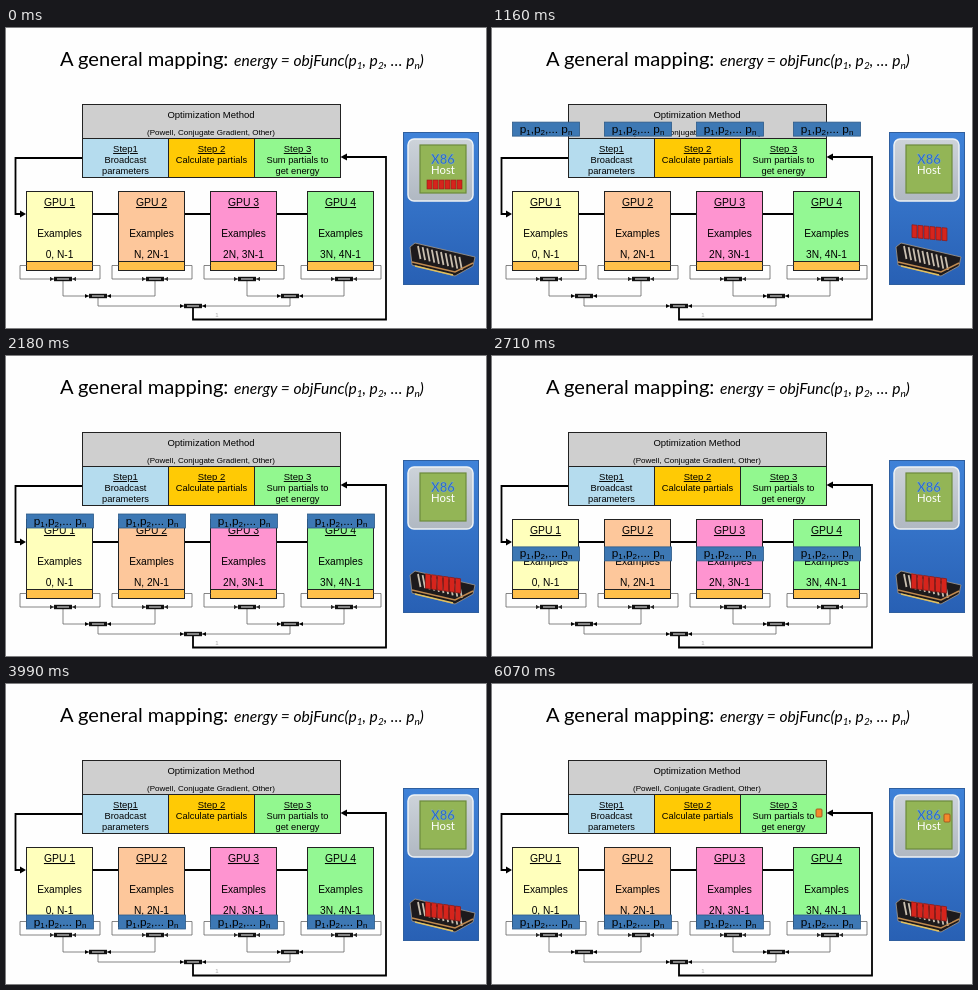
Animation of 480x300 px, one loop 6100 ms. Source, as an HTML page:

```html
<!DOCTYPE html>
<html lang="en">
<head>
<meta charset="utf-8">
<title>A general mapping</title>
<style>
  html, body { margin: 0; width: 100%; height: 100%; overflow: hidden; background: #fefefe; }
  svg { display: block; width: 480px; height: 300px; font-family: "Liberation Sans", Arial, sans-serif; }
  .lato { font-family: Lato, "Open Sans", sans-serif; }
  .mid { text-anchor: middle; }
  .u { text-decoration: underline; }
  .box { stroke: #222; stroke-width: 1; }
  .wire { fill: none; stroke: #000; stroke-width: 1.8; }
  .thin { fill: none; stroke: #666; stroke-width: .8; }
</style>
</head>
<body>
<svg id="stage" viewBox="0 0 480 300"></svg>
<script>
const LOOP = 6100;
const columns = [20.5, 112.5, 204.5, 301.5];
const fills = ['#ffffbc', '#fdc79b', '#fe94d0', '#93f893'];
const ranges = ['0, N-1', 'N, 2N-1', '2N, 3N-1', '3N, 4N-1'];

const rect = (x, y, w, h, fill, extra = '') =>
  `<rect x="${x}" y="${y}" width="${w}" height="${h}" fill="${fill}" ${extra}/>`;
const path = (d, cls) => `<path class="${cls}" d="${d}"/>`;
const label = (x, y, size, text, cls = '', extra = '') =>
  `<text class="mid ${cls}" x="${x}" y="${y}" font-size="${size}" ${extra}>${text}</text>`;
const sub = (text, size, shift) =>
  `<tspan font-size="${size}" dy="${shift}">${text}</tspan><tspan dy="${-shift}">&#8203;</tspan>`;

function title() {
  const p = n => 'p' + sub(n, 10, 3);
  return `<g class="lato"><text x="54" y="38" font-size="20.1">A general mapping:</text>
    <text x="228" y="38" font-size="15.6" font-style="italic">energy = objFunc(${p(1)}, ${p(2)}, … ${p('n')})</text></g>`;
}

function methodBox() {
  const steps = [
    ['#b5dcee', 'Step1', 'Broadcast', 'parameters'],
    ['#ffca05', 'Step 2', 'Calculate partials', ''],
    ['#92f88f', 'Step 3', 'Sum partials to', 'get energy']
  ];
  return rect(76.5, 76.5, 258, 34, '#cfcfcf', 'class="box"') +
    label(205, 90, 9.5, 'Optimization Method') +
    label(205, 107, 8.05, '(Powell, Conjugate Gradient, Other)') +
    steps.map(([fill, head, a, b], i) => {
      const x = 76.5 + 86 * i, c = x + 43;
      return rect(x, 110.5, 86, 39, fill, 'class="box"') +
        label(c, 124, 9.5, head, 'u') + label(c, 135, 9.3, a) + label(c, 146, 9.3, b);
    }).join('');
}

function gpu(x, i) {
  const c = x + 33;
  return rect(x, 163.5, 66, 79, fills[i], 'class="box"') +
    rect(x, 233.5, 66, 9, '#ffc04a', 'class="box"') +
    label(c, 178, 10.4, `GPU ${i + 1}`, 'u') +
    label(c, 209, 10.2, 'Examples') + label(c, 230, 10.2, ranges[i]) +
    path(`M${x} 237.5h-6.5v13.5h34M${x + 66} 237.5h7.5v13.5h-28`, 'thin');
}

// A small adder with an arrowhead on either side.
const adder = (x, y) =>
  rect(x - 9, y - 2.2, 18, 4.4, '#111') + rect(x - 6, y - .8, 12, 1.6, '#a0a0a0') +
  `<path d="M${x - 9} ${y}l-4-2v4zM${x + 9} ${y}l4-2v4z"/>`;

function wiring() {
  const sums = columns.map(x => x + 36.5);
  return path('M87 186H112M179 186H204M271 186H301', 'wire') +
    path('M76 130H9.5V186H16', 'wire') + '<path d="M20 186l-6-3.5v7z"/>' +
    path('M187 279V291.5H380V129H340', 'wire') + '<path d="M334.5 129l6.5-3.5v7z"/>' +
    path(`M${sums[0]} 253V268H${sums[1]}V253M${sums[2]} 253V268H${sums[3]}V253M92 270V278H284V270`, 'thin') +
    sums.map(x => adder(x, 251)).join('') + adder(92, 268) + adder(284, 268) + adder(187, 278) +
    label(211, 289, 6, '1', '', 'fill="#aaa"');
}

function card() {
  const ribs = Array.from({ length: 10 }, (_, i) =>
    `<path d="M${412 + i * 4.6} ${218 + i * 1.2}l2.5 13" stroke="#c9bfb0" stroke-width="1.8"/>`).join('');
  return `<path d="M404 219l5-4 60 14-2 9-18 10-43-11z" fill="#1d1a1c" stroke="#a59a8c" stroke-width=".8"/>${ribs}
    <path d="M406 234l43 10 18-9" fill="none" stroke="#c08a50" stroke-width="1.4"/>
    <path d="M409 238l38 9" fill="none" stroke="#e0c060" stroke-width="1.4"/>`;
}

function host() {
  return rect(397.5, 104.5, 75, 152, 'url(#panel)', 'stroke="#2f5f9f"') +
    rect(402, 111, 65, 62, 'url(#case)', 'rx="6" stroke="#eef2f5" stroke-width="1.5"') +
    rect(414, 117, 46, 48, '#93b556', 'stroke="#6c8a3c" stroke-width="1.2"') +
    label(437, 136, 13, 'X86', 'lato', 'font-weight="bold" fill="#2f6fc4" stroke="#8bb4dc" stroke-width=".3"') +
    label(437, 146, 11.3, 'Host', 'lato', 'fill="#fff"') + card();
}

const chips = Array.from({ length: 6 }, (_, i) =>
  rect(-17.5 + i * 6, -4.5, 5, 9, '#d6241c', 'stroke="#8e1c18" stroke-width=".6"')).join('');
const bars = columns.map(x =>
  rect(x, 0, 67, 14, '#3d78b4', 'stroke="#2c5a88" stroke-width=".8"') +
  label(x + 33.5, 10.5, 11.8, `p${sub(1, 8, 2)},p${sub(2, 8, 2)},... p${sub('n', 8, 2)}`)).join('');
const token = id => `<g id="${id}">${rect(-3, -4, 6, 8, '#f58a2c', 'rx="1" stroke="#a0521c" stroke-width=".9"')}</g>`;
const gradient = (id, top, bottom) =>
  `<linearGradient id="${id}" x2="0" y2="1"><stop stop-color="${top}"/><stop offset="1" stop-color="${bottom}"/></linearGradient>`;

document.getElementById('stage').innerHTML =
  `<defs>${gradient('panel', '#3f82d8', '#2860b4')}${gradient('case', '#cdd3da', '#b0b8c2')}</defs>` +
  title() + methodBox() + wiring() + columns.map(gpu).join('') + host() +
  `<g id="chips">${chips}</g><g id="bars">${bars}</g>` + token('sum') + token('reply');

const [chipsEl, barsEl, sumEl, replyEl] =
  ['chips', 'bars', 'sum', 'reply'].map(id => document.getElementById(id));
const progress = (t, start, span) => Math.min(1, Math.max(0, (t - start) / span));

// Constant acceleration to the midpoint, then constant deceleration.
function ease(t, start, span) {
  const u = progress(t, start, span);
  return u < .5 ? 2 * u * u : 1 - 2 * (1 - u) ** 2;
}
const move = (el, x, y, more = '') => el.setAttribute('transform', `translate(${x} ${y}) ${more}`);

// Position along the return wire, from the last adder to step 3.
function alongWire(d) {
  if (d < 193) return [187 + d, 291.5];
  if (d < 355.5) return [380, 291.5 - (d - 193)];
  return [380 - (d - 355.5), 129];
}

function draw(t) {
  // Bars fly in to the top of the boxes, then ease down to the bottom.
  move(barsEl, 0, -15 + 162 * progress(t, 90, 1590) + 84 * ease(t, 1650, 2075));

  const s = ease(t, 105, 1760);
  move(chipsEl, 438.5 - 1.5 * s, 156.5 + 71 * s, `skewY(${8 * s}) scale(1 ${1 + .6 * s})`);

  const r = ease(t, 4030, 1880);
  const shown = t >= 4030 ? 'visible' : 'hidden';
  sumEl.setAttribute('visibility', shown);
  replyEl.setAttribute('visibility', shown);
  move(sumEl, ...alongWire(408.5 * r));
  move(replyEl, 455, 233 - 99 * r);
}

const begin = performance.now();
function frame() {
  draw((performance.now() - begin) % LOOP);
  requestAnimationFrame(frame);
}
frame();
</script>
</body>
</html>
```
